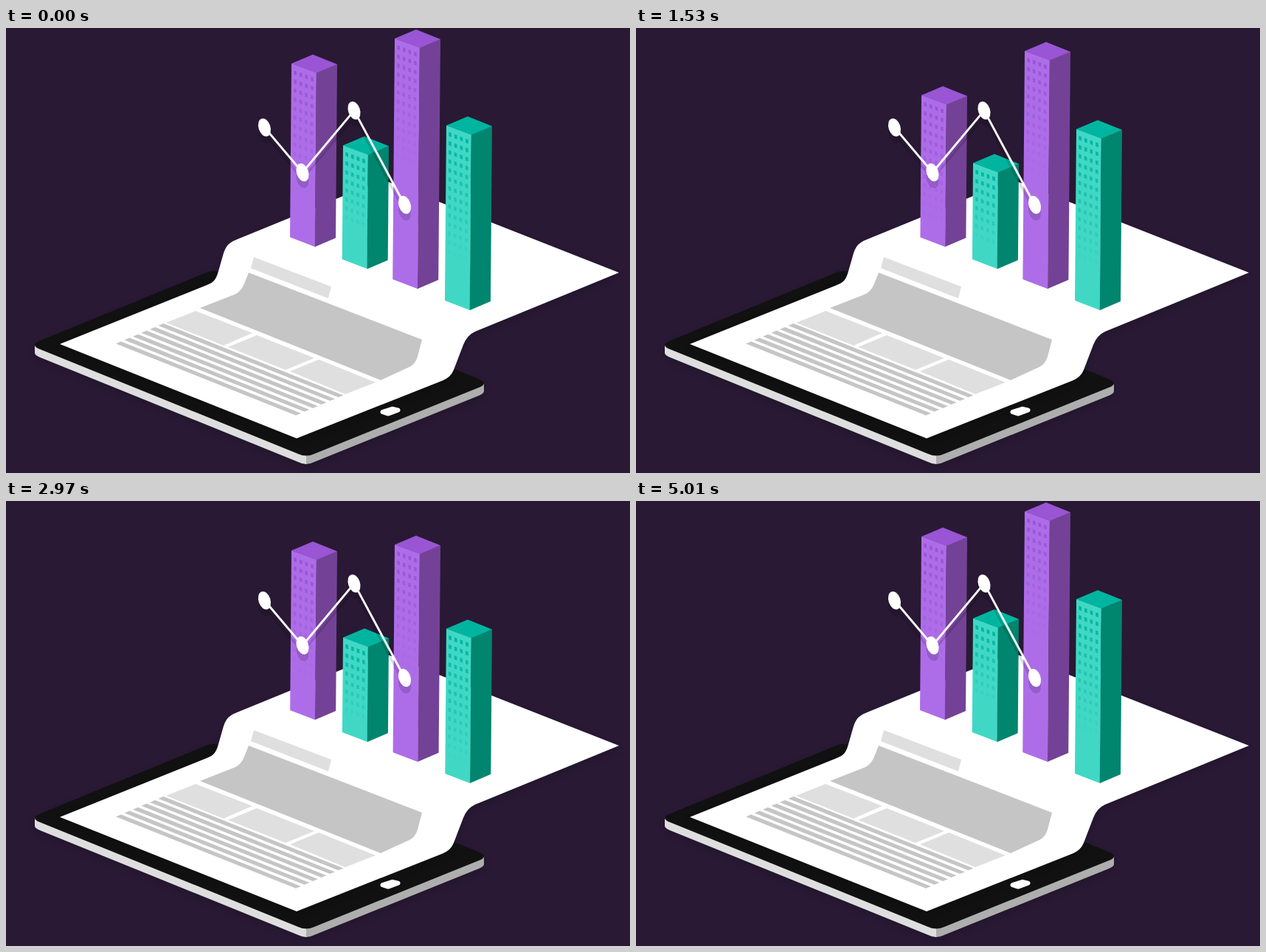
An HTML page that plays this animation: 846x604 px, repeating every 5.04 s.

```html
<!DOCTYPE html>
<html lang="en">
<head>
<meta charset="utf-8">
<title>Tablet chart</title>
<style>
html, body { margin: 0; width: 100%; height: 100%; overflow: hidden; background: #291934; }
svg { display: block; width: 846px; height: 604px; }
.soft { filter: drop-shadow(0 4px 4px rgba(0, 0, 0, .13)); }
.chart { filter: drop-shadow(0 9px .6px rgba(0, 0, 0, .14)); }
.light { fill: #dfdfdf; }
.grey { fill: #c5c5c5; }

.purple { --top: #9955d4; --left: #ae6de8; --right: #734296; }
.teal { --top: #00b5a0; --left: #40d8c5; --right: #00856f; }
.top { fill: var(--top); }
.left { fill: var(--left); }
.right { fill: var(--right); }

/* Bars sink and rise in whole pixels */
.sink { animation: 5040ms infinite; }
#bar0 { animation-name: sink0; }
#bar1 { animation-name: sink1; }
#bar2 { animation-name: sink2; }
#bar3 { animation-name: sink3; }
@keyframes sink0 {
  0% { transform: translateY(0); animation-timing-function: steps(51); }
  35.714% { transform: translateY(51px); animation-timing-function: steps(51); }
  72.024%, 100% { transform: translateY(0); }
}
@keyframes sink1 {
  0%, 8.333% { transform: translateY(0); animation-timing-function: steps(40); }
  44.643% { transform: translateY(40px); animation-timing-function: steps(40); }
  84.325%, 100% { transform: translateY(0); }
}
@keyframes sink2 {
  0%, 16.766% { transform: translateY(0); animation-timing-function: steps(50); }
  54.921% { transform: translateY(50px); animation-timing-function: steps(50); }
  91.964%, 100% { transform: translateY(0); }
}
@keyframes sink3 {
  0%, 25.794% { transform: translateY(0); animation-timing-function: steps(50); }
  65.536% { transform: translateY(50px); animation-timing-function: steps(50); }
  99.802%, 100% { transform: translateY(0); }
}
</style>
</head>
<body>
<svg viewBox="0 0 846 604">
  <g class="soft">
    <path fill="#dedede" d="M39 430V441Q39 444 46 447L396 589Q402 592 407 592V575Z"/>
    <path fill="#aeaeae" d="M648 482V493Q648 496 641 499L418 589Q412 592 407 592V575Z"/>
    <path fill="#111" d="M46 424.500L270 332.500Q279 328 288 331L641 476.500Q655 482 641 488L418 578Q407 583 396 578L46 436Q32 430 46 424.500Z"/>
  </g>
  <path class="soft" fill="#fff" d="M73 429L272 349C282 345 285 341 288 330L294 309C298 296 301 292 313 287L511 206L831 332L636 412Q625 417 620 430L607 464Q603 474 592 478.500L394 557Z"/>

  <path class="light" d="M336 311L441 351L437 367L332 326Z"/>
  <path class="grey" d="M329 332L564 423L558 446Q555 456 547 460L508 478L263 380L309 362Q319 358 323 347Z"/>
  <path class="light" d="M257 384L334 414L295 431L217 400ZM340 417L418 448L379 464L301 433ZM424 450L501 481L460 497L385 466Z"/>
  <g id="lines" class="grey"></g>
  <path fill="#fff" stroke="#fff" stroke-width="6" stroke-linejoin="round" d="M510.500 521.200L524 516.800L531.500 518.700L518 523.600Z"/>

  <g id="bars"></g>

  <g class="chart" fill="#fff">
    <path fill="none" stroke="#fff" stroke-width="2.800" d="M350.500 135L402 196L472 112L540.500 240"/>
    <g id="dots"></g>
  </g>
</svg>
<script>
const put = (id, html) => { document.getElementById(id).innerHTML = html; };
const list = (n, fn) => Array.from({ length: n }, (_, i) => fn(i)).join("");

put("lines", list(6, i =>
  `<path transform="translate(${11.5 * i} ${-4.9 * i})" d="M149 428.500L156 425.500L400 523L393 525.700Z"/>`));

put("dots", [[350.5, 135], [402, 196], [472, 112], [540.5, 240]].map(([x, y]) =>
  `<ellipse rx="8" ry="12.500" transform="translate(${x} ${y}) rotate(-18)"/>`).join(""));

// Window rows fade out towards the foot of the bar
const windowRows = rows => list(rows, r =>
  `<path class="top" opacity="${(1 - r / rows).toFixed(2)}" d="${list(4, c =>
    `M${(-25.6 + 7.6 * c - 0.1 * r).toFixed(1)} ${(21.3 + 2.9 * c + 12.2 * r).toFixed(1)}l3.600 1.400v5.500l-3.600-1.400z`)}"/>`);

// x, y: top corner; footX, footY: front corner on the page
const bars = [
  { tone: "purple", x: 416, y: 36, footX: 419, footY: 297, rows: 13 },
  { tone: "teal", x: 486, y: 147, footX: 490, footY: 327, rows: 8 },
  { tone: "purple", x: 556, y: 2, footX: 558, footY: 354, rows: 13 },
  { tone: "teal", x: 626, y: 120, footX: 629, footY: 383, rows: 14 }
];

put("bars", bars.map(({ tone, x, y, footX, footY, rows }, i) => `
  <clipPath id="clip${i}">
    <path d="M${footX - 60} -20V${footY - 22.9}L${footX} ${footY}L${footX + 60} ${footY - 25.7}V-20Z"/>
  </clipPath>
  <g class="${tone}" clip-path="url(#clip${i})">
    <g id="bar${i}" class="sink">
      <g transform="translate(${x} ${y})">
        <path class="left" d="M-29 12L5 24.500L2 365H-32Z"/>
        <path class="right" d="M4.800 24.500L33 13L30 365H1.800Z"/>
        <path class="top" d="M0 0L33 13.300L4.800 25L-29 12.300Z"/>
        ${windowRows(rows)}
      </g>
    </g>
  </g>`).join(""));
</script>
</body>
</html>
```
